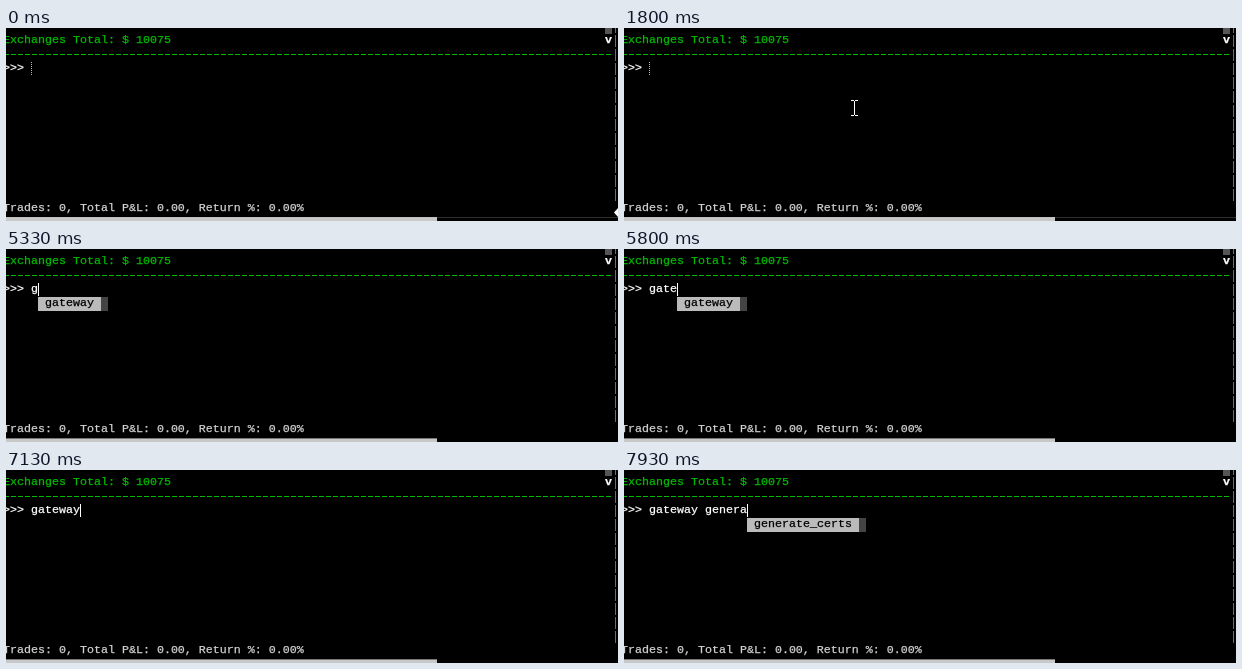
Recreate the animation shown at these times as an HTML page. Size 612x193 px, loop 8 s.

```html
<!DOCTYPE html>
<html lang="en">
<head>
<meta charset="utf-8">
<title>Terminal</title>
<style>
  html, body { margin: 0; width: 100%; height: 100%; overflow: hidden; background: #000; }
  #stage {
    --green: #0b0;
    position: relative; width: 612px; height: 193px; overflow: hidden; background: #000;
    font: 11.667px/13px "Liberation Mono", "DejaVu Sans Mono", monospace;
    -webkit-text-stroke: .25px;
    color: #d2d2d2;
  }
  #stage div, #stage svg { position: absolute; white-space: pre; }
  #stage .row { left: -3px; height: 14px; }
  #stage .green { color: var(--green); }
  #stage .white { color: #fff; }
  #rule {
    left: -2px; top: 26px; width: 608px; height: 1px;
    background: repeating-linear-gradient(90deg, var(--green) 0 5px, #000 5px 7px);
  }
  #rail {
    left: 609px; top: -7px; width: 1px; height: 180px;
    background: repeating-linear-gradient(var(--green) 0 12px, #000 12px 14px);
  }
  #arrow { left: 599px; top: 6px; color: #fff; font-weight: bold; }
  #knob { left: 599px; top: 0; width: 7px; height: 6px; background: #555; }
  #bar { left: 0; top: 189px; width: 431px; height: 4px; background: #c8c8c8; }
  #edge { left: 0; top: 189px; width: 612px; height: 1px; background: #0006; }
  #caret { top: 34px; width: 1px; height: 13px; background: #fff; }
  .idle #edge { background: #aaa4; }
  .idle #caret { background: repeating-linear-gradient(#bbb 0 1px, #000 1px 2px) !important; }
  #menu { top: 48px; background: #bbb; color: #000; border-right: 7px solid #444; }
  #stage #menu .item { position: static; height: 14px; }
  #resize { left: 608px; top: 180px; }
</style>
</head>
<body>
<div id="stage">
  <div class="row green" style="top:6px">Exchanges Total: $ 10075</div>
  <div id="rule"></div>
  <div class="row white" id="prompt" style="top:34px"></div>
  <div class="row" style="top:174px">Trades: 0, Total P&amp;L: 0.00, Return %: 0.00%</div>
  <div id="rail"></div>
  <div id="knob"></div>
  <div id="arrow">v</div>
  <div id="bar"></div>
  <div id="edge"></div>
  <div id="menu"></div>
  <div id="caret"></div>
  <svg id="resize" width="4" height="9" fill="#fff"><path d="M0 4.5L4 0V9z"/></svg>
  <svg id="mouse" width="7" height="16" fill="#fff" shape-rendering="crispEdges">
    <path d="M0 0h3v1h-3zM4 0h3v1h-3zM3 1h1v14h-1zM0 15h3v1h-3zM4 15h3v1h-3z"/>
  </svg>
</div>
<script>
const LOOP = 8000, CELL = 7, TICK = 200 / 3;
const ENTER = 70, FOCUS = 4870, HIDE = 5270;
const $ = id => document.getElementById(id);
const CERTS = ["generate_certs"];
const GATEWAY = ["gateway"];

// [time, typed text, completions]
const typing = [
  [0, "", []],
  [5270, "g", []],
  [5330, "g", GATEWAY],
  [5470, "ga", GATEWAY],
  [5670, "gat", GATEWAY],
  [5800, "gate", GATEWAY],
  [6070, "gatew", GATEWAY],
  [6130, "gatewa", GATEWAY],
  [7130, "gateway", []],
  [7200, "gateway ", [...CERTS, "list-configs", "update"]],
  [7470, "gateway ge", CERTS],
  [7530, "gateway gen", CERTS],
  [7670, "gateway gene", CERTS],
  [7800, "gateway gener", CERTS],
  [7930, "gateway genera", CERTS]
];

// [start, end, x, y]: the pointer reaches x, y at the end of each move
const moves = [
  [0, 0, 611, 184],
  [0, 870, 549, 177],
  [870, 930, 532, 166],
  [930, 1000, 514, 175],
  [1400, 1800, 230, 80],
  [4600, 4670, 241, 67],
  [4670, 4730, 241, 56],
  [4800, 4870, 240, 47],
  [4870, 5000, 239, 43]
];

const ease = p => 1 - (1 - p) ** 1.5;

function pointerAt(t) {
  let [, , x, y] = moves[0];
  for (const [start, end, nx, ny] of moves.slice(1)) {
    if (t < start) break;
    // positions update on a coarse tick and land on the end point
    const tick = Math.floor((t - start + 4) / TICK) * TICK;
    const p = t >= end ? 1 : ease(Math.min(1, tick / (end - start)));
    x += (nx - x) * p;
    y += (ny - y) * p;
  }
  return [Math.round(x), Math.round(y)];
}

let shown = null;

function showTyping(step) {
  if (step === shown) return;
  shown = step;
  const [, text, items] = step;
  const x = 25 + text.length * CELL;
  const width = Math.max(0, ...items.map(s => s.length)) + 2;
  $("prompt").textContent = ">>> " + text;
  $("caret").style.left = x + "px";
  const menu = $("menu");
  menu.style.display = items.length ? "block" : "none";
  menu.style.left = x + "px";
  menu.style.width = width * CELL + "px";
  menu.replaceChildren(...items.map(s => {
    const item = document.createElement("div");
    item.className = "item";
    item.textContent = " " + s;
    return item;
  }));
}

const show = (id, on) => { $(id).style.display = on ? "block" : "none"; };

function draw(now) {
  const t = now % LOOP;
  showTyping(typing.findLast(s => s[0] <= t));
  $("stage").classList.toggle("idle", t < FOCUS);
  const [x, y] = pointerAt(t);
  show("resize", t < ENTER);
  show("mouse", t >= ENTER && t < HIDE);
  $("mouse").style.left = x - 3 + "px";
  $("mouse").style.top = y - 8 + "px";
}

const begin = performance.now();
function loop() {
  draw(performance.now() - begin);
  requestAnimationFrame(loop);
}
loop();
</script>
</body>
</html>
```
